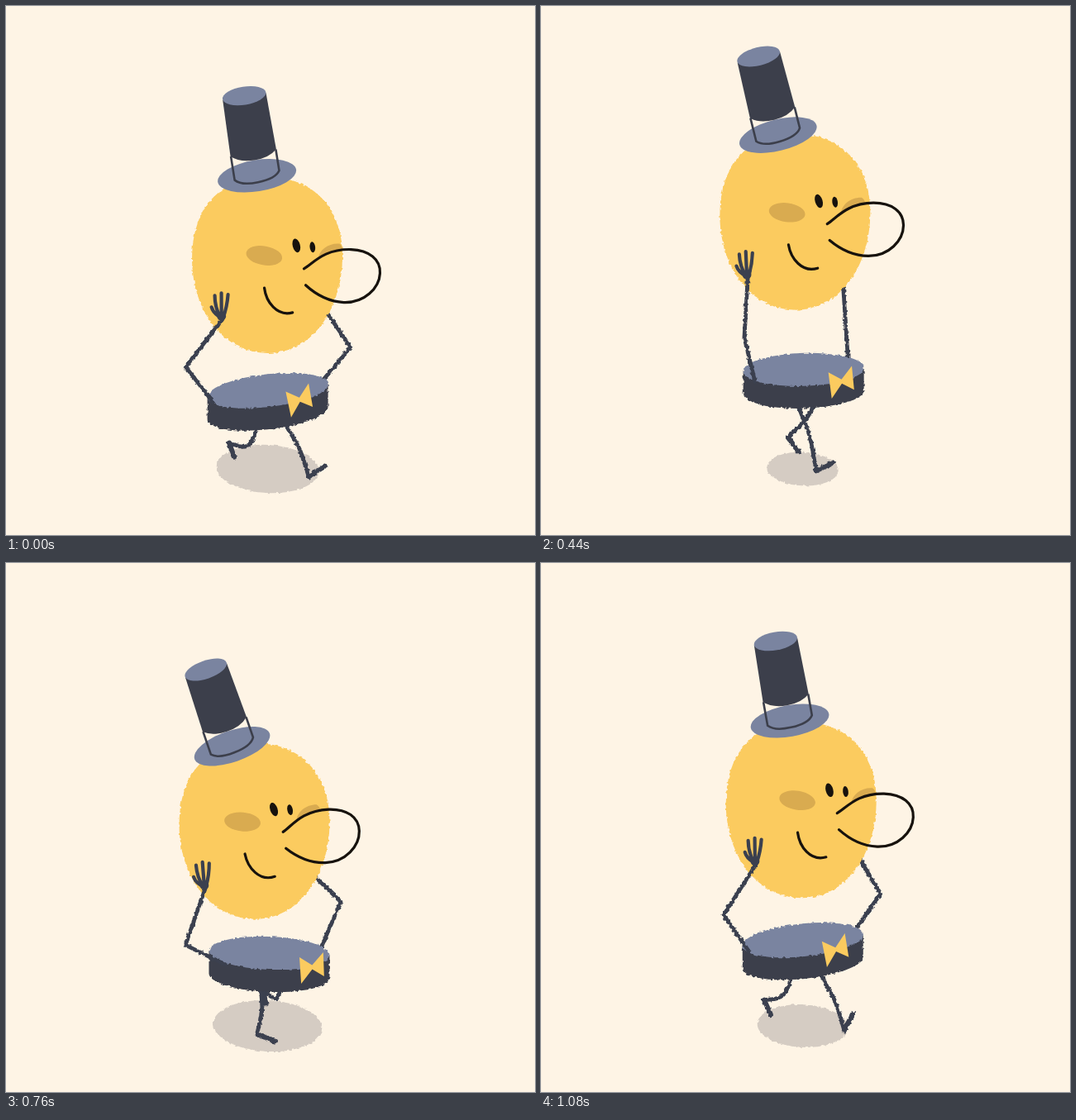
These frames come from a looping animation (640x640 px, 1120 ms). An HTML page:

```html
<!DOCTYPE html>
<html lang="en">
<head>
<meta charset="utf-8">
<title>Strolling gentleman</title>
<style>
  html, body { margin: 0; height: 100%; overflow: hidden; background: #fef4e5; }
  svg { display: block; width: 100%; height: 100%; }
  .limb { fill: none; stroke: #3b404f; stroke-width: 4.8; stroke-linecap: round; stroke-linejoin: round; }
  .foot { stroke-width: 6; }
  .ink { fill: none; stroke: #17120d; stroke-width: 3.2; stroke-linecap: round; }
  .dark { fill: #3c3f4b; }
  .blue { fill: #7a84a0; }
  .yellow { fill: #fbcb5f; }
  .cheek { fill: #d9ab50; }
</style>
</head>
<body>
<svg viewBox="0 0 640 640">
  <filter id="fuzz" filterUnits="userSpaceOnUse" x="0" y="0" width="640" height="640" color-interpolation-filters="sRGB">
    <feTurbulence type="fractalNoise" baseFrequency=".3" seed="4"/>
    <feDisplacementMap in="SourceGraphic" scale="4.5" xChannelSelector="R" yChannelSelector="G"/>
  </filter>

  <g filter="url(#fuzz)">
    <ellipse id="shadow" fill="#d5ccc3"/>
    <path id="farLeg" class="limb"/>
    <path id="farFoot" class="limb foot"/>
    <path id="nearLeg" class="limb"/>
    <path id="nearFoot" class="limb foot"/>
    <path id="farArm" class="limb"/>
    <path id="egg" class="yellow" d="M-91 -9C-91 -70 -58 -108 0 -108C60 -108 91 -66 91 -13C91 52 54 105 1 105C-56 105 -91 50 -91 -9Z"/>
    <g id="drum">
      <path class="dark" d="M-73 -13V14A73 20 0 0 0 73 14V-13Z"/>
      <ellipse class="blue" cy="-13" rx="73" ry="20"/>
    </g>
    <path id="nearArm" class="limb"/>
  </g>

  <g id="face">
    <path class="limb" style="stroke-width: 4.2" d="M-56 62Q-66 57 -68 49M-57 62Q-64 50 -64 35M-56 62V32M-54 62Q-49 48 -48 34"/>
    <circle fill="#3b404f" cx="-56" cy="60" r="5.5"/>
    <ellipse class="cheek" rx="22" ry="11.5" transform="translate(-4 -13) rotate(10)"/>
    <path class="cheek" d="M61 -9C63 -20 74 -28 87 -27Q91 -24 91 -19Q76 -18 61 -9Z"/>
    <ellipse fill="#17120d" rx="4.5" ry="8.5" transform="translate(35 -25) rotate(-14)"/>
    <ellipse fill="#17120d" rx="3.3" ry="6.5" transform="translate(54.5 -23) rotate(-6)"/>
    <path class="ink" d="M44 3C55 -3 68 -21 101 -20C123 -19 137 -8 136 9C135 27 117 45 92 44C73 43 59 35 46 23"/>
    <path class="ink" d="M-4 26C-2 43 11 61 30 56"/>
  </g>
  <path id="tie" class="yellow" d="M-15 -13L0 -3L14 -18V11L0 2L-14 19Z"/>
  <g id="hat">
    <ellipse class="blue" rx="48" ry="19"/>
    <path fill="none" stroke="#3c3f4b" stroke-width="2.6" d="M-27.5 -28V1Q-20 9 0 8Q22 7 27.5 -2V-28"/>
    <path class="dark" d="M-26.5 -97L-28 -28Q-18 -19 0 -19Q18 -19 28 -28L26.5 -97Z"/>
    <ellipse class="blue" cy="-98" rx="26.5" ry="11"/>
  </g>
</svg>
<script>
const LOOP = 1120, HALF = LOOP / 2, STEP = 40;
const { PI, sin, cos, max, exp, hypot, atan2, acos } = Math;

const wave = (t, peak, period = LOOP) => cos(2 * PI * (t - peak) / period);
const mid = (a, b) => (a + b) / 2;

// One bounce per stride: a longer dip and a shorter rise.
function bounce(t, dip, rise) {
  const p = (t + 43) % HALF;
  return p < 320 ? dip * sin(PI * p / 320) : -rise * sin(PI * (p - 320) / 240);
}

// Joint between two ends of a limb; side picks the way it bends.
function joint([ax, ay], [bx, by], upper, lower, side) {
  const dx = bx - ax, dy = by - ay, d = Math.min(hypot(dx, dy), upper + lower);
  const bend = acos((upper * upper + d * d - lower * lower) / (2 * upper * d));
  const angle = atan2(dy, dx) + side * bend;
  return [ax + upper * cos(angle), ay + upper * sin(angle)];
}

function set(id, attrs) {
  const el = document.getElementById(id);
  for (const name in attrs) el.setAttribute(name, attrs[name]);
}
const line = (id, ...points) => set(id, { d: "M" + points.join("L") });
const place = (id, x, y, more) => set(id, { transform: `translate(${x} ${y}) ${more}` });

// The foot circles under the hip, the knee sags while it swings, the toe lifts before landing.
function leg(name, t, hipX, hipY, rise, lift, sag) {
  const swing = max(0, wave(t, 140));
  const x = hipX - 8 + 35 * wave(t, 530) + 6 * wave(t, 530, HALF);
  const y = 551 + 25 * wave(t, 600) + bounce(t, 5, 5) - rise - lift * swing;
  const knee = [mid(hipX, x) + 6, mid(hipY, y) + sag * swing];
  set(name + "Leg", { d: `M${hipX} ${hipY}C${knee} ${knee} ${x} ${y}` });

  const angle = (50 + 30 * wave(t, 140) - 105 * exp(-(((t - 495) / 90) ** 2))) * PI / 180;
  const size = 23 - 7 * swing;
  line(name + "Foot", [x, y], [x + size * cos(angle), y + size * sin(angle)]);
}

function draw(t) {
  const sway = (1 + wave(t, 700)) / 2;
  const yaw = sway * sway * (3 - 2 * sway);
  const headX = 317 - 16.5 * yaw, headY = 299 + bounce(t, 39, 43);
  const drumX = 316.5 + 2 * yaw, dip = bounce(t, 24, 18.5), drumY = 468.5 + dip;
  const slant = 8.5 * yaw - 6.5;
  const turn = -4.4 * yaw, r = turn * PI / 180, faceX = headX + 1 - 10.5 * yaw;
  const onFace = (x, y) => [faceX + x * cos(r) - y * sin(r), headY + x * sin(r) + y * cos(r)];

  const radius = 57 + 16 * wave(t, 112, HALF);
  set("shadow", { cx: 316.5, cy: 560, rx: radius, ry: radius * .47, transform: "rotate(3 316 560)" });

  place("egg", headX, headY, "");
  place("face", faceX, headY, `rotate(${turn})`);
  place("hat", headX - 11.5 - 15.5 * yaw, headY - 110 + 6 * yaw, `rotate(${-7.3 - 12 * sway})`);
  place("drum", drumX, drumY, `skewY(${slant})`);
  place("tie", drumX + 38 + 14 * yaw, drumY - 2 + 6.5 * yaw, `rotate(${slant - 4})`);

  const wrist = onFace(-55, 64), shoulder = [drumX - 67 + 14 * yaw, drumY + 1];
  line("nearArm", wrist, joint(wrist, shoulder, 72.5, 54, 1), shoulder);
  const farWrist = onFace(59, 38), farShoulder = [drumX + 58 + .24 * dip, drumY - 18];
  line("farArm", farWrist, joint(farWrist, farShoulder, 73, 62, -1), farShoulder);

  leg("near", t, 307, drumY + 22, 0, 0, 32);
  leg("far", (t + HALF) % LOOP, 334, drumY + 22, 8, 14, 20);
}

function tick() {
  draw(Math.floor(performance.now() % LOOP / STEP) * STEP);
  requestAnimationFrame(tick);
}
tick();
</script>
</body>
</html>
```
